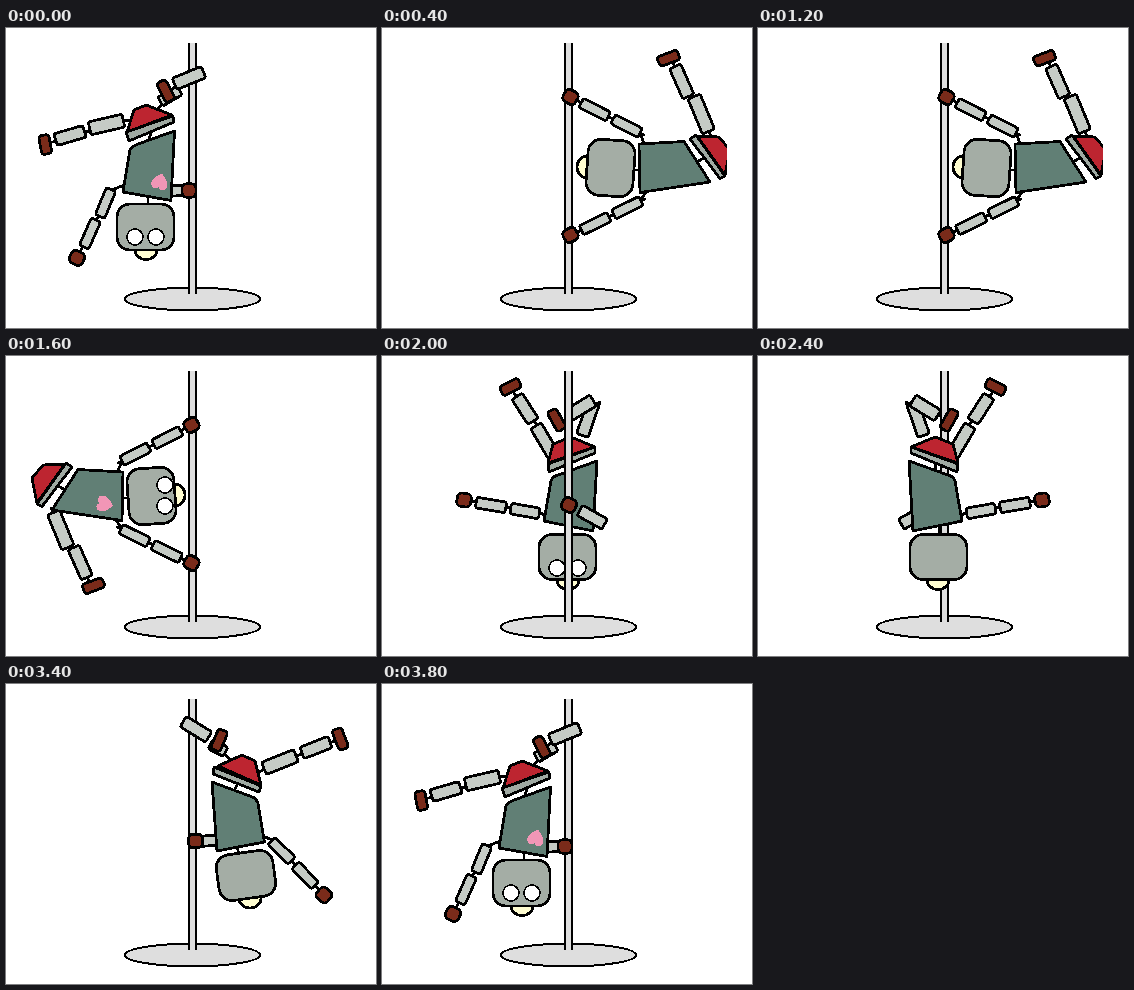
Recreate the animation shown at these times as an HTML page. Size 370 by 300 pixels, loop 4000 ms.

```html
<!DOCTYPE html>
<html lang="en">
<head>
<meta charset="utf-8">
<title>Pole dancing robot</title>
<style>
html, body { margin: 0; width: 100%; height: 100%; overflow: hidden; background: #fff; }
svg { display: block; width: 370px; height: 300px; shape-rendering: crispEdges; }
</style>
</head>
<body>
<svg viewBox="0 0 370 300" stroke="#000" stroke-width="2.8" stroke-linejoin="round" stroke-linecap="round">
  <defs><clipPath id="stage"><rect x="0" y="0" width="345" height="300"/></clipPath></defs>
  <ellipse cx="186.5" cy="271" rx="67.5" ry="11.3" fill="#dedede" stroke-width="2"/>
  <g id="back" clip-path="url(#stage)"></g>
  <g stroke-width="2" stroke-linecap="butt">
    <rect x="183" y="15" width="7" height="251" fill="#dedede" stroke="none"/>
    <path d="M183 15V266M190 15V266"/>
  </g>
  <g id="front" clip-path="url(#stage)"></g>
</svg>
<script>
const METAL = '#c5cbc5', BROWN = '#7a2b1a', GREEN = '#617f75', RED = '#bd2530', BAND = '#a0aaa3';

// A bar along the line from (x1,y1) to (x2,y2), w wide, with a small gap at both ends.
function bar(x1, y1, x2, y2, w, fill = METAL, rx = 2.5) {
  const length = Math.hypot(x2 - x1, y2 - y1) - 5.4;
  const height = w - 1.8;
  const angle = Math.atan2(y2 - y1, x2 - x1) * 180 / Math.PI;
  return `<rect x="${-length / 2}" y="${-height / 2}" width="${length}" height="${height}" rx="${rx}" fill="${fill}"
    transform="translate(${(x1 + x2) / 2} ${(y1 + y2) / 2}) rotate(${angle})"/>`;
}
const foot = (x1, y1, x2, y2) => bar(x1, y1, x2, y2, 12, BROWN, 3);
const hand = (x, y, turn = 0) =>
  `<rect x="-7" y="-6.7" width="14" height="13.4" rx="4.5" fill="${BROWN}" transform="translate(${x} ${y}) rotate(${turn})"/>`;
const shape = (points, fill) => `<polygon points="${points}" fill="${fill}"/>`;
const joint = points => `<polyline points="${points}" fill="none"/>`;
const hat = (x, y, rx = 11, ry = 9.5) => `<ellipse cx="${x}" cy="${y}" rx="${rx}" ry="${ry}" fill="#fffdd0"/>`;
const head = (x, y, w, h, turn = 0) =>
  `<rect x="${-w / 2}" y="${-h / 2}" width="${w}" height="${h}" rx="13" fill="#a4ada5" transform="translate(${x} ${y}) rotate(${turn})"/>`;
const eye = (x, y) => `<circle cx="${x}" cy="${y}" r="8" fill="#fff" stroke-width="1.6"/>`;
const heart = (x, y, turn) => `<path d="M0 8C-12 0-8-8-4-8Q-1-8 0-5Q1-8 4-8C8-8 12 0 0 8Z"
  fill="#f196b6" stroke="none" transform="translate(${x} ${y}) rotate(${turn})"/>`;
const group = (transform, content) => `<g transform="${transform}">${content}</g>`;

function leftSide() {
  return joint('40,116 120,92 128,95') + joint('149,83 160,73') + joint('145,103 143,113')
    + joint('118,157 106,162 71,230') + joint('142,166 142,178')
    + bar(47, 112.5, 81, 102.5, 14) + bar(81, 101, 120, 92, 15) + foot(37, 104.5, 41.5, 128.5)
    + bar(152, 75, 176, 61, 12) + bar(166, 57, 200, 43, 14) + foot(153.5, 51, 166, 75)
    + shape('128,82 140,77 166,87 121,104', RED)
    + shape('120,104 167,88 168,94 123,113', BAND)
    + bar(162, 163, 182, 162.5, 12)
    + shape('124,122 126,119 132,116 168.5,103 165,172.5 117,164', GREEN) + heart(154, 153.5, 195)
    + bar(106, 159, 93, 191, 12) + bar(91, 189.5, 77, 221.5, 12)
    + hand(71, 230, 25) + hand(183, 162.5)
    + hat(140, 222) + head(139.5, 199, 57, 46) + eye(129, 209) + eye(150, 209);
}

function rightSide() {
  return joint('227,79 217,68') + joint('250,90 258,85 334,55') + joint('232,99 228,107')
    + joint('257,152 266,156 318,211') + joint('231,162 233,171')
    + bar(202, 59, 222, 69, 12) + bar(175, 36, 205, 54.5, 14) + foot(218.5, 44, 208, 68.5)
    + bar(255.5, 85.5, 292.5, 70.5, 15) + bar(293.5, 70, 326.5, 57, 14) + foot(329.5, 42.5, 339, 67.5)
    + shape('212,82 236,71 249,77 255,101', RED)
    + shape('208,83 255,102 253,108 207,90', BAND)
    + bar(192, 157.5, 213, 156, 12)
    + shape('206,98 249,114 252,119 258.5,158 211,167', GREEN)
    + bar(263.5, 155, 287.5, 178.5, 12) + bar(287.5, 179.5, 311, 203.5, 12)
    + hand(318, 211, 42) + hand(189.5, 157)
    + hat(244, 214.5) + head(240, 191.5, 57, 46, -8);
}

// Upright and in line with the pole; facing shows the eyes.
function centre(facing) {
  const forearm = bar(195.5, 153, 225, 169.5, 13.5);
  return joint('128,31 134,40 154,68 172,101') + joint('190,103 188,113') + joint('205,80 218,46 185,60')
    + joint('168,161 158,157 82,144') + joint('185,168 185,182')
    + bar(133.5, 38, 152.5, 67.5, 14) + bar(152.5, 67.5, 173, 102, 14) + foot(117, 37, 140, 25)
    + bar(199.5, 82, 212.5, 44, 14) + foot(168, 52, 181.5, 76) + bar(184, 61, 213.5, 43, 14.5)
    + shape('171,88 189,81 213,91 166,107', RED)
    + shape('166,108 213,91 213,97 167,116', BAND)
    + (facing ? '' : forearm)
    + shape('169,125 171,121 176,119 215,105 211,175 162,165', GREEN)
    + (facing ? forearm : '')
    + bar(160, 158, 126, 152, 12.5) + bar(126.5, 152, 91.5, 146, 12.5) + hand(82, 144, 8)
    + hat(186, 224) + head(185.5, 201, 57, 45) + (facing ? eye(175, 212) + eye(196, 212) : '');
}

// Horizontal hold: trunk and leg on one layer, arms and hands separate.
function trunk(facing, legTransform) {
  const leg = joint('329,108 326,102 309,68 292,37 287,31')
    + bar(327.5, 106, 311, 66, 15) + bar(307.5, 71, 292, 36, 14) + foot(274, 35, 299, 25.5);
  return group(legTransform, leg) + joint('312,136 323,129') + joint('251,142 259,142')
    + shape('257,116 302,113.5 328,154 258,164.5', GREEN) + (facing ? heart(275, 148, 80) : '')
    + shape('315,108 337,109 348,122 343,147', RED)
    + shape('308,111 314,107 343,148 338,150.5', BAND)
    + hat(205, 139, 10, 11) + head(228.5, 140, 47, 56, 4)
    + (facing ? eye(215, 129) + eye(215, 150) : '');
}
function arm(handX, handY, x, y) {
  const at = k => [handX + (x - handX) * k, handY + (y - handY) * k];
  return joint([handX, handY, x, y]) + bar(...at(.12), ...at(.55), 12) + bar(...at(.55), ...at(.98), 12);
}
const arms = shoulder => joint(`${shoulder - 4},105 ${shoulder},115`) + joint(`${shoulder - 3},172 ${shoulder + 3},162`)
  + arm(188, 69, shoulder, 107) + arm(188, 208, shoulder + 1, 171);
const grips = hand(188.5, 69, 28) + hand(188.5, 207, -28);
const legDown = 'translate(0 260) scale(1 -1)';
const mirror = x => `translate(${x} 0) scale(-1 1)`;

const poses = {
  left: ['', leftSide()],
  right: ['', rightSide()],
  behind: [centre(true), hand(187, 149, 25)],
  before: ['', group(mirror(366), centre(false))],
  flatRight: ['', arms(262) + trunk(false, '') + grips],
  flatLeft: ['', group(mirror(374), arms(262) + trunk(true, legDown) + grips)],
  flatBehind: [group(mirror(411), trunk(true, legDown)) + group(mirror(374), arms(225)), group(mirror(374), grips)],
  flatBefore: ['', arms(237) + group('translate(-26 0)', trunk(false, 'translate(0 27) scale(1 .75)')) + grips]
};

const routine = ('left flatBefore flatRight flatBehind flatLeft flatBefore flatRight flatBehind flatLeft '
  + 'right behind left before right behind left before right behind left').split(' ');
const STEP = 200;
const back = document.getElementById('back'), front = document.getElementById('front');
let shown;

function draw(time) {
  const name = routine[Math.floor(time / STEP) % routine.length];
  if (name === shown) return;
  shown = name;
  [back.innerHTML, front.innerHTML] = poses[name];
}

const start = performance.now();
function tick() {
  draw(performance.now() - start);
  requestAnimationFrame(tick);
}
tick();
</script>
</body>
</html>
```
